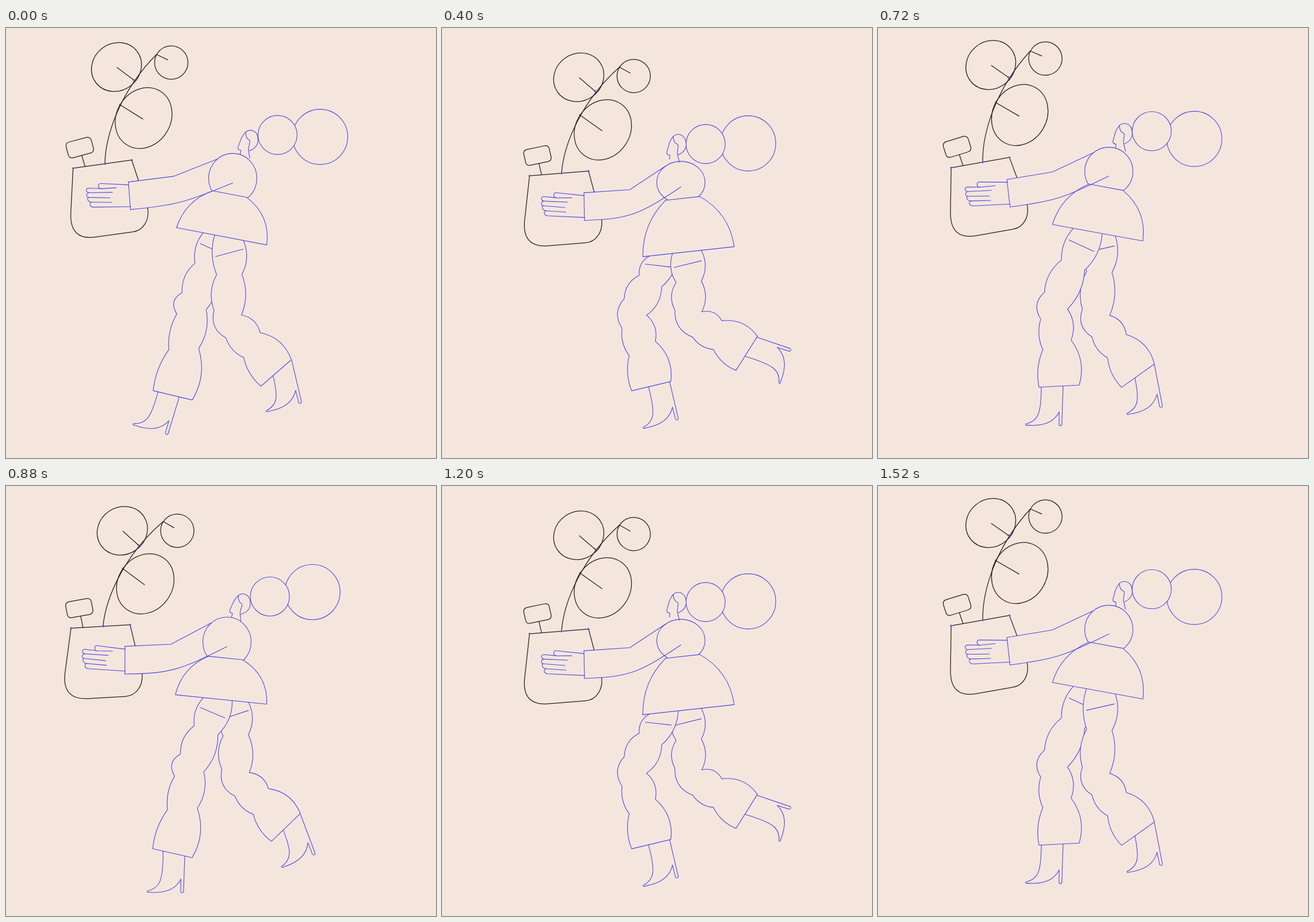
Recreate the animation shown at these times as an HTML page with a canvas. Size 748 by 748 pixels, loop 1.6 s.

```html
<!DOCTYPE html>
<html lang="en">
<head>
<meta charset="utf-8">
<title>Walking with a potted plant</title>
<style>
  html, body { margin: 0; width: 100%; height: 100%; overflow: hidden; background: #f4e6dd; }
  canvas { display: block; }
</style>
</head>
<body>
<canvas id="stage" width="748" height="748"></canvas>
<script>
const ctx = document.getElementById('stage').getContext('2d');
const PAPER = '#f4e6dd', BLUE = '#4f49df', INK = '#211f1e';
const STEP_MS = 80, STRIDE = 20, HALF = 10;
const RAD = Math.PI / 180;

// Key poses of one leg: hip x, knee x, knee y, cuff x, cuff y, foot angle.
const stride = {
  0: [368, 327, 484, 290, 639, 16],
  2: [370, 318, 497, 299, 635, -14],
  5: [386, 334, 497, 364, 623, -14],
  7: [394, 370, 503, 413, 613, -14],
  10: [388, 389, 507, 470, 600, -14],
  13: [421, 433, 506, 516, 580, -44],
  15: [426, 433, 505, 530, 566, -72],
  17: [393, 342, 498, 461, 562, -52],
  19: [365, 308, 485, 315, 623, 1]
};
const strideKeys = Object.keys(stride).map(Number);

// Smooth cyclic interpolation through the key poses.
function legPose(step) {
  const n = strideKeys.length;
  const time = i => strideKeys[(i + n) % n] + STRIDE * Math.floor(i / n);
  const pose = i => stride[strideKeys[(i + n) % n]];
  let i = n - 1;
  while (strideKeys[i] > step) i--;
  const t0 = time(i), t1 = time(i + 1), span = t1 - t0, u = (step - t0) / span;
  return pose(i).map((a, j) => {
    const b = pose(i + 1)[j];
    const ma = (b - pose(i - 1)[j]) / (t1 - time(i - 1)) * span;
    const mb = (pose(i + 2)[j] - a) / (time(i + 2) - t0) * span;
    return a + u * (ma + u * (3 * (b - a) - 2 * ma - mb + u * (2 * (a - b) + ma + mb)));
  });
}

// Cosine that reaches 1 at the step called peak.
const swing = (step, peak, period = HALF) => Math.cos(2 * Math.PI * (step - peak) / period);

// The upper body bobs twice per stride, each part with its own delay.
function bodyPose(k) {
  const chest = [
    400 - 18 * swing(k, 1.5) + 5 * swing(k, 0, 5),
    262.5 + 19 * swing(k, 2.8) + 2.5 * swing(k, 0, 5)
  ];
  const head = [chest[0] + 13.5 + 17.5 * swing(k, 0), chest[1] - 69];
  const bun = [head[0] + 47, head[1] - 2 - 9 * swing(k, 1.7)];
  return {
    chest, head, bun,
    bigBun: [bun[0] + 74, bun[1] + 1 - 18 * swing(k, 2.7)],
    chestHeight: 40 - 3.5 * swing(k, 5.5),
    lean: 0.7 + 9 * swing(k, -0.5) + 1.7 * swing(k, -0.3, 5),
    skirt: 112 - 11.5 * swing(k, 1),
    headTilt: 7.5 * swing(k, 2),
    pot: [134.5 - 21.5 * swing(k, 0.95), 250.5 + 7.5 * swing(k, 4.2)],
    potTilt: -4.9 + 5.4 * swing(k, 3) - 1.4 * swing(k, -0.2, 5)
  };
}

const mix = (a, b, u) => a.map((v, i) => v + (b[i] - v) * u);
const shift = (p, ...moves) => moves.reduce(
  ([x, y], [dir, dist]) => [x + dir[0] * dist, y + dir[1] * dist], p);
const unit = ([x, y]) => [x / Math.hypot(x, y), y / Math.hypot(x, y)];
const heading = (a, b) => unit([b[0] - a[0], b[1] - a[1]]);
const ahead = ([x, y]) => [-y, x];

// Maps local points into a frame with the given origin and tilt.
function frame([ox, oy], tilt) {
  const c = Math.cos(tilt * RAD), s = Math.sin(tilt * RAD);
  return (x, y) => [ox + x * c - y * s, oy + x * s + y * c];
}

function placed(origin, tilt, draw) {
  ctx.save();
  ctx.translate(...origin);
  ctx.rotate(tilt * RAD);
  draw();
  ctx.restore();
}

function pen(color, width) {
  ctx.strokeStyle = color;
  ctx.lineWidth = width;
}

function line(...points) {
  ctx.beginPath();
  for (const p of points) ctx.lineTo(...p);
  ctx.stroke();
}

function ellipse([x, y], rx, ry = rx, tilt = 0, fill = false) {
  ctx.beginPath();
  ctx.ellipse(x, y, rx, ry, tilt * RAD, 0, 7);
  if (fill) ctx.fill();
  ctx.stroke();
}

function sketch(d, fill = false) {
  const path = new Path2D(d);
  if (fill) ctx.fill(path);
  ctx.stroke(path);
}

// Adds a curve that bulges to the right-hand side of its way.
function bow(a, b, bulge) {
  const dir = ahead(heading(a, b));
  ctx.quadraticCurveTo(...shift(mix(a, b, 0.5), [dir, 2 * bulge]), ...b);
}

function drawLeg(step, hipLine) {
  const [hipX, kneeX, kneeY, cuffX, cuffY, footAngle] = legPose(step);
  const hip = hipLine(hipX), knee = [kneeX, kneeY], cuff = [cuffX, cuffY];
  const thighDir = heading(hip, knee), shinDir = heading(knee, cuff);
  const n = ahead(thighDir), m = ahead(shinDir);
  const kneeOut = unit([n[0] + m[0], n[1] + m[1]]);
  const thigh = mix(hip, knee, 0.45), shin = mix(knee, cuff, 0.48);

  const landing = Math.max(0, swing(step, -1, STRIDE)) ** 4;
  placed(shift(cuff, [m, 26 * landing - 14]), footAngle, () => sketch(
    'M-19-8L-19 0C-18 49-24 61-45 66Q-46 69-42 68Q0 71 13 44L13 66Q16 70 18 66L19-8', true));

  const hipFront = hipLine(hipX - 25), hipBack = hipLine(hipX + 25);
  const thighFront = shift(thigh, [n, 22]), thighBack = shift(thigh, [n, -22]);
  const outline = [
    [hipFront, 0],
    [thighFront, 6],
    [shift(knee, [thighDir, -16], [n, 27]), 7],
    [shift(knee, [shinDir, 20], [m, 26]), 10],
    [shift(shin, [shinDir, 7], [m, 25]), 5],
    [shift(cuff, [m, 35]), 5],
    [shift(cuff, [m, -35]), 0],
    [shift(shin, [shinDir, -7], [m, -25]), 10],
    [shift(knee, [kneeOut, -22]), 7],
    [thighBack, 7],
    [hipBack, 7]
  ];
  ctx.beginPath();
  ctx.moveTo(hipFront[0], hipFront[1] - 5);
  ctx.lineTo(...hipFront);
  for (let i = 1; i < outline.length; i++) bow(outline[i - 1][0], ...outline[i]);
  ctx.lineTo(hipBack[0], hipBack[1] - 5);
  ctx.fill();
  ctx.stroke();

  const reach = swing(step, 1, STRIDE);
  line(mix(hipFront, thighFront, 0.45 - 0.1 * reach), mix(hipBack, thighBack, 0.38 + 0.13 * reach));
}

function drawPlant() {
  pen(INK, 1.25);
  sketch('M0 0L-15 78C-20 108-8 124 22 124L88 124C106 124 119 108 119 88L103 0Z');
  sketch('M56-1C64-50 100-122 171-176');
  sketch('M21 0L18-20');
  sketch('M-1-46L31-50Q37-50 38-44L40-29Q40-23 34-22L2-18Q-4-18-5-24L-7-39Q-7-45-1-46Z');
  ellipse([99, -164], 45, 41, -30);
  ellipse([194.5, -158.5], 29);
  ellipse([133.5, -69.5], 55, 47, -50);
  sketch('M100-163L126-137M171-176L189-164M95-99L132-68');
  pen(BLUE, 1);
  for (const [x, y] of [[0, 0], [56, 0], [103, 0], [126, -137]]) {
    line([x - 2, y], [x + 2, y]);
    line([x, y - 2], [x, y + 2]);
  }
}

function drawHand() {
  sketch('M92 42L44 33C38 32 38 41 43 42L70 44');
  sketch('M44 42L22 38C16 38 16 45 22 46L62 51');
  sketch('M22 46C16 46 15 53 20 54L57 60');
  sketch('M20 54C15 55 18 62 24 63L58 68');
  sketch('M24 63C18 64 20 71 26 72L90 80');
  sketch('M92 37L89 85');
}

function drawHead() {
  sketch('M-9-11C-4-17 13-17 13 3C13 12 6 18-1 21');
  sketch('M-9-11C-8 4-2 0-1 4C-1 10-3 14-3 19L0 34');
  sketch('M-9-11C-17-3-17 4-20 12C-23 20-20 20-16 21L-17 28');
}

function drawSkirt(length) {
  const corners = [[-30, 28], [-80, length], [80, length], [30, 28]];
  ctx.beginPath();
  ctx.moveTo(...corners[0]);
  bow(corners[0], corners[1], 11);
  ctx.lineTo(...corners[2]);
  bow(corners[2], corners[3], 13);
  ctx.closePath();
  ctx.fill();
  ctx.stroke();
}

function drawWalker(step) {
  const body = bodyPose(step);
  const [chestX, chestY] = body.chest;
  const held = frame(body.pot, body.potTilt);
  const cuffTop = held(92, 37), cuffLow = held(89, 85);
  const elbow = held(172, 38), bend = held(174, 89);
  const shoulder = [chestX - 27, chestY - 0.77 * body.chestHeight];
  const armEnd = [chestX, chestY + 8];
  const lowerArm = () => {
    ctx.beginPath();
    ctx.moveTo(...cuffLow);
    ctx.bezierCurveTo(...mix(cuffLow, bend, 0.9), ...mix(armEnd, bend, 0.9), ...armEnd);
  };

  placed(body.pot, body.potTilt, drawPlant);
  pen(BLUE, 1.1);
  lowerArm();
  for (const p of [shoulder, elbow, cuffTop]) ctx.lineTo(...p);
  ctx.fill();
  placed(body.pot, body.potTilt, drawHand);

  const hem = frame(body.chest, body.lean)(0, body.skirt);
  const hipLine = x => [x, hem[1] + (x - hem[0]) * Math.tan(body.lean * RAD)];
  drawLeg(step, hipLine);
  drawLeg((step + HALF) % STRIDE, hipLine);

  ellipse(body.chest, 42, body.chestHeight, 0, true);
  placed(body.chest, body.lean, () => drawSkirt(body.skirt));
  line(cuffTop, elbow, shoulder);
  lowerArm();
  ctx.stroke();

  placed(body.head, body.headTilt, drawHead);
  ellipse(body.bigBun, 48);
  ellipse(body.bun, 34, 34, 0, true);
}

function render(elapsed) {
  ctx.fillStyle = PAPER;
  ctx.fillRect(0, 0, 748, 748);
  ctx.lineCap = ctx.lineJoin = 'round';
  drawWalker(Math.floor(elapsed / STEP_MS) % STRIDE);
}

const start = performance.now();
function tick() {
  render(performance.now() - start);
  requestAnimationFrame(tick);
}
tick();
</script>
</body>
</html>
```
